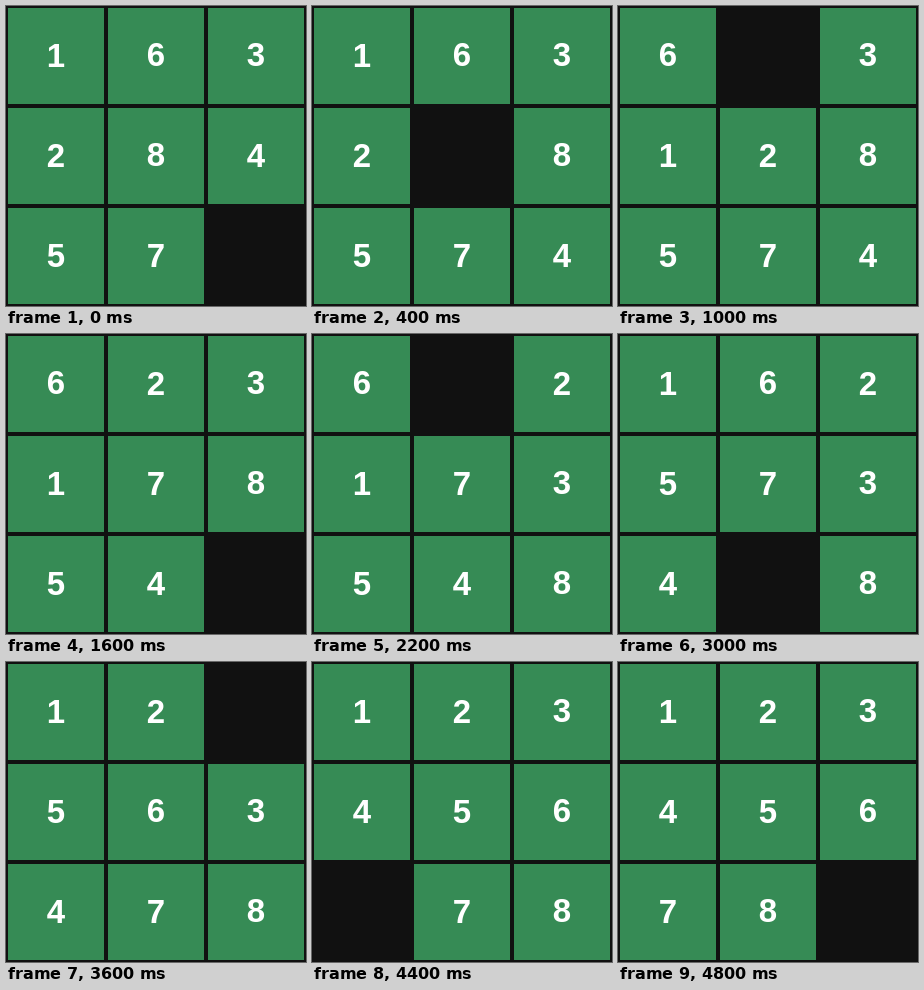
Animation, 300 px wide and 300 px high, one loop 9.2 s. Source, as an HTML page:

```html
<!DOCTYPE html>
<html lang="en">
<head>
<meta charset="utf-8">
<title>Sliding puzzle</title>
<style>
  html, body { margin: 0; width: 100%; height: 100%; overflow: hidden; background: #111; }
  svg { display: block; width: 300px; height: 300px; }
  rect { fill: #368b55; }
  text { fill: #fff; font: bold 33px "Liberation Sans", Arial, sans-serif; text-anchor: middle; }
</style>
</head>
<body>
<svg id="board" viewBox="0 0 300 300"></svg>
<script>
  const LOOP = 9200, STEP = 200;
  const START = "16328457_";
  // Cells the gap visits, numbered row by row from 0.
  const GAP_PATH = [..."8543014785210367412543678"].map(Number);
  const ROUND_DIGITS = "368";

  const board = document.getElementById("board");

  function add(parent, name, attrs) {
    const el = document.createElementNS("http://www.w3.org/2000/svg", name);
    for (const key in attrs) el.setAttribute(key, attrs[key]);
    return parent.appendChild(el);
  }

  const tiles = {};
  for (const digit of "12345678") {
    const tile = tiles[digit] = add(board, "g", {});
    add(tile, "rect", { x: 2, y: 2, width: 96, height: 96 });
    // Round digits overshoot the baseline, so they sit slightly higher.
    const y = ROUND_DIGITS.includes(digit) ? 60 : 61;
    add(tile, "text", { x: 50, y }).textContent = digit;
  }

  // Every board state, each made by swapping the gap with its next cell.
  const states = [[...START]];
  for (let i = 1; i < GAP_PATH.length; i++) {
    const cells = [...states[i - 1]];
    cells[GAP_PATH[i - 1]] = cells[GAP_PATH[i]];
    cells[GAP_PATH[i]] = "_";
    states.push(cells);
  }

  let shown = -1;
  function draw() {
    const time = performance.now() % LOOP;
    const index = Math.min(Math.floor(time / STEP), states.length - 1);
    if (index !== shown) {
      shown = index;
      states[index].forEach((digit, cell) => {
        if (digit === "_") return;
        const x = cell % 3 * 100, y = Math.floor(cell / 3) * 100;
        tiles[digit].setAttribute("transform", `translate(${x} ${y})`);
      });
    }
    requestAnimationFrame(draw);
  }
  draw();
</script>
</body>
</html>
```
